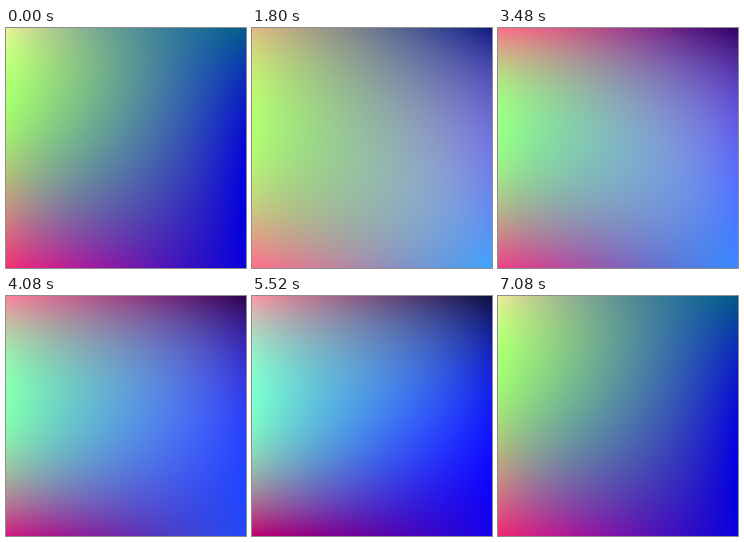
An HTML page with a canvas that plays this animation: 300x300 px, repeating every 7.2 s.

```html
<!DOCTYPE html>
<html lang="en">
<head>
<meta charset="utf-8">
<title>Colour drift</title>
<style>
html, body { margin: 0; width: 100%; height: 100%; overflow: hidden; }
canvas { display: block; width: 300px; height: 300px; }
</style>
</head>
<body>
<canvas id="stage" width="300" height="300"></canvas>
<script>
const SIZE = 300, LOOP = 7200, STEP = 120;

// Each pose is a 4 by 4 mesh of colours, row by row, 100 px apart.
const poses = [
  { at: 0, mesh: `eef09a 84b092 3a7f98 006088
                  a6ff6e 76b88a 4070a8 0a18c8
                  bcb07c 6a80a0 4048b4 0000e0
                  f23070 a81c9c 5014b8 0a00e0` },
  { at: 840, mesh: `c4f878 70b884 308090 004c7c
                    baff70 88cc80 6a98a4 4464b4
                    c0e078 90b490 789cb4 5070d0
                    ff7090 b088a8 7890d0 4898ff` },
  { at: 2520, mesh: `fc8490 b46c8c 6a3c94 200080
                     b4ff74 a0c49c 9098c0 7064e0
                     c0e080 a0c8a0 94b0d0 7088ff
                     ff6488 c87c9c 7c94c8 38a8ff` },
  { at: 3480, mesh: `ff6c8c c85488 7c2c88 300060
                     a0ff84 8cc4a8 8090c8 6050d8
                     a8d888 84b4b4 789cd8 5070ff
                     f04084 a850a4 6470d0 3c88ff` },
  { at: 4680, mesh: `ff98a8 a86090 682c70 200840
                     80ffd4 60b0dc 3c70e8 1020e0
                     88d8c0 5090e0 2848fc 0018ff
                     b80078 780090 4010b8 1010f0` },
  { at: 6360, mesh: `fc98a0 a07888 405878 001838
                     8cffc0 6cb8c8 4878d0 1820d0
                     98c8a4 6088c8 3c48e0 1c04f8
                     cc0068 900090 5000b8 1c00e8` }
];
for (const p of poses) {
  p.rgb = p.mesh.match(/[0-9a-f]{2}/g).map(h => parseInt(h, 16));
}

const count = poses.length;
const pose = i => poses[(i + count) % count];
const span = i => (pose(i + 1).at - pose(i).at + LOOP) % LOOP;
const slope = (i, c) => (pose(i + 1).rgb[c] - pose(i).rgb[c]) / span(i);

// Tangent that never overshoots: flat at a turning point.
function tangent(i, c) {
  const a = slope(i - 1, c), b = slope(i, c);
  return a * b > 0 ? 2 * a * b / (a + b) : 0;
}

function meshAt(time) {
  let i = count - 1;
  while (poses[i].at > time) i--;
  const d = span(i), u = (time - poses[i].at) / d, v = 1 - u;
  return poses[i].rgb.map((from, c) =>
    from * (1 + 2 * u) * v * v + pose(i + 1).rgb[c] * (3 - 2 * u) * u * u +
    d * u * v * (tangent(i, c) * v - tangent(i + 1, c) * u));
}

// Cubic weights of the four mesh lines for every pixel position.
const weights = Array.from({ length: SIZE }, (_, p) => {
  const s = (p + 0.5) / 100;
  return [0, 1, 2, 3].map(k => {
    let w = 1;
    for (let j = 0; j < 4; j++) if (j !== k) w *= (s - j) / (k - j);
    return w;
  });
});

const ctx = document.getElementById("stage").getContext("2d");
const image = ctx.createImageData(SIZE, SIZE);

function draw(time) {
  const mesh = meshAt(time), row = new Float64Array(12), data = image.data;
  let n = 0;
  for (let y = 0; y < SIZE; y++) {
    const wy = weights[y];
    for (let c = 0; c < 12; c++) {
      row[c] = wy[0] * mesh[c] + wy[1] * mesh[c + 12] +
               wy[2] * mesh[c + 24] + wy[3] * mesh[c + 36];
    }
    for (let x = 0; x < SIZE; x++) {
      const wx = weights[x];
      for (let c = 0; c < 3; c++) {
        data[n++] = wx[0] * row[c] + wx[1] * row[c + 3] +
                    wx[2] * row[c + 6] + wx[3] * row[c + 9];
      }
      data[n++] = 255;
    }
  }
  ctx.putImageData(image, 0, 0);
}

const start = performance.now();
let shown = -1;
function tick() {
  const time = Math.floor((performance.now() - start) % LOOP / STEP) * STEP;
  if (time !== shown) draw(shown = time);
  requestAnimationFrame(tick);
}
tick();
</script>
</body>
</html>
```
